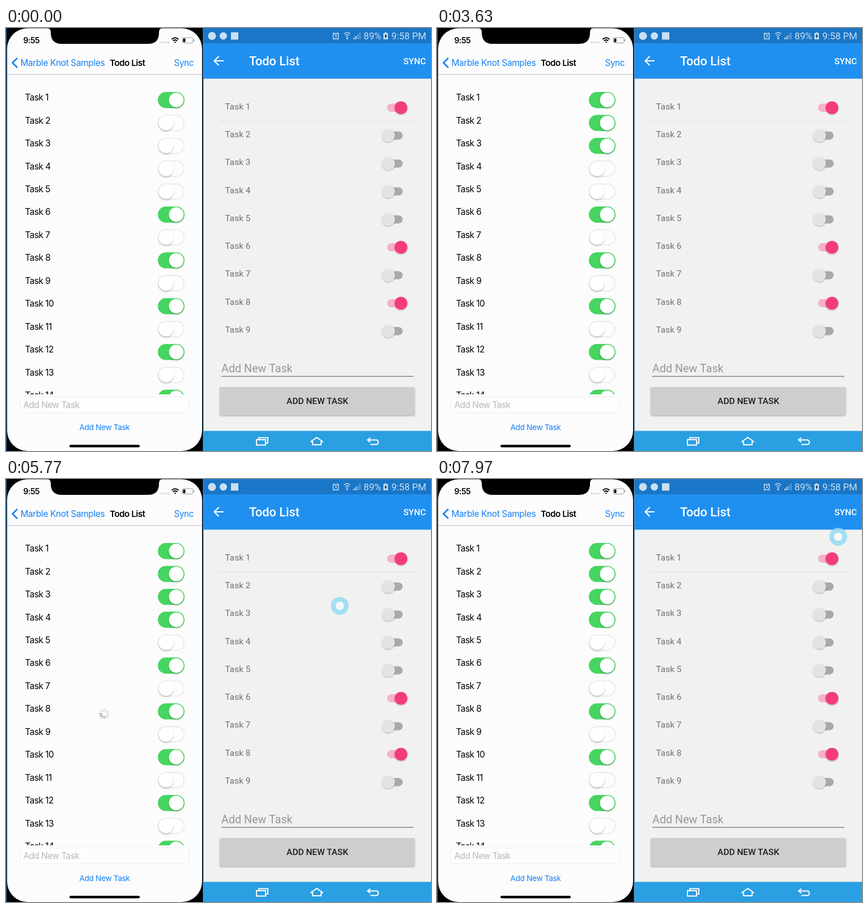
Recreate the animation shown at these times as an HTML page. Size 750 by 747 pixels, loop 8 s.

```html
<!DOCTYPE html>
<html lang="en">
<head>
<meta charset="utf-8">
<title>Todo List</title>
<style>
html, body { margin: 0; width: 100%; height: 100%; overflow: hidden; background: #000; }
svg { display: block; width: 750px; height: 747px; }
.ios { font-family: Inter, sans-serif; font-size: 15.4px; letter-spacing: -.5px; }
.droid { font-family: Roboto, sans-serif; }
.med { font-weight: 500; }
</style>
</head>
<body>
<svg viewBox="0 0 750 747" xmlns="http://www.w3.org/2000/svg">
  <defs>
    <clipPath id="list"><rect x="2" y="83" width="344" height="564"/></clipPath>
    <clipPath id="screen"><rect x="348.500" y="0" width="401.500" height="747"/></clipPath>
    <filter id="soft" x="-50%" y="-50%" width="200%" height="200%">
      <feDropShadow dx="0" dy="2" stdDeviation="1.6" flood-color="#000" flood-opacity=".24"/>
    </filter>
    <filter id="lift" x="-20%" y="-20%" width="140%" height="150%">
      <feDropShadow dx="0" dy="1.2" stdDeviation="1" flood-color="#000" flood-opacity=".3"/>
    </filter>
  </defs>

  <rect width="750" height="747"/>
  <rect width="1.5" height="747" fill="#144f82"/>
  <rect x="347" width="2" height="747" fill="#124a7c"/>

  <g class="ios">
    <rect x="2" y="0.5" width="344" height="746.5" rx="36" fill="#fcfcfc"/>
    <path d="M73 0Q79 1 79 7V8Q79 28 98 28H251Q270 28 270 8V7Q270 1 276 0Z"/>
    <text x="30.500" y="26.500" font-size="14" font-weight="600">9:55</text>
    <g fill="#d8d0b8"><circle cx="273" cy="25.500" r="1.500"/><circle cx="277.500" cy="25.500" r="1.500"/><circle cx="282" cy="25.500" r="1.500"/><circle cx="286.500" cy="25.500" r="1.500"/></g>
    <g fill="none" stroke="#000" stroke-width="2">
      <path d="M292.500 20Q298.500 14.500 304.500 20M294.800 22.800Q298.500 19.500 302.200 22.800"/>
      <path d="M297.300 25.200H299.700"/>
    </g>
    <rect x="311" y="17" width="19" height="9.500" rx="2.500" fill="none" stroke="#999"/>
    <rect x="312.500" y="18.500" width="4" height="6.500" rx="1"/>
    <path d="M331.500 20V23.500" stroke="#999" stroke-width="1.500"/>
    <path d="M20 53L11.500 61.500L20 70" fill="none" stroke="#1580f5" stroke-width="2.700"/>
    <text x="25.500" y="67" fill="#1580f5" letter-spacing="-.35">Marble Knot Samples</text>
    <text x="183" y="67" font-size="15.200" font-weight="600">Todo List</text>
    <text x="331" y="67" text-anchor="end" fill="#1580f5">Sync</text>
    <path d="M2 82H346" stroke="#b8b8d0"/>
    <g id="iosRows" clip-path="url(#list)"></g>
    <rect x="24.500" y="651.500" width="299" height="28" rx="5" fill="#fdfdfd" stroke="#eeeef1"/>
    <text x="30.500" y="670.500" fill="#b8b8bd">Add New Task</text>
    <text x="174" y="710" text-anchor="middle" font-size="13.750" letter-spacing="-.4" fill="#1580f5">Add New Task</text>
    <rect x="112" y="736" width="124" height="4.600" rx="2.300"/>
    <g id="spinner" transform="translate(173.500 414.500)"></g>
  </g>

  <g class="droid" clip-path="url(#screen)">
    <rect x="348" width="402" height="747" fill="#f1f1f0"/>
    <rect x="348" y="27" width="402" height="62.500" fill="#2090f0"/>
    <rect x="348" width="402" height="27" fill="#1a76c6"/>
    <g fill="#c9e0f4">
      <circle cx="363.500" cy="14" r="7"/>
      <circle cx="383.500" cy="14" r="6.500"/>
      <rect x="397" y="7.500" width="13" height="13"/>
    </g>
    <g fill="none" stroke="#c9e0f4" stroke-width="1.400">
      <circle cx="582" cy="14.500" r="4.800"/>
      <path d="M582 11.500V15H584M576.500 10.500L579.500 8M587.500 10.500L584.500 8M578.500 18.500L577 20.500M585.500 18.500L587 20.500"/>
      <path d="M596.500 10.500Q602 5.500 607.500 10.500M598.500 13.300Q602 10 605.500 13.300M600.300 16Q602 14.500 603.700 16"/>
    </g>
    <g fill="#c9e0f4">
      <circle cx="602" cy="18.500" r="1.500"/>
      <path d="M613 17H615V20H613ZM616.500 14H618.500V20H616.500Z"/>
      <path d="M620 11H622V20H620ZM623.500 8H625.500V20H623.500Z" opacity=".45"/>
      <path d="M666 9H668.500V7.500H671.500V9H674V20H666Z"/>
      <path d="M671 9.500L667.500 15H669.500L669 19L672.800 13.500H670.500Z" fill="#163e63"/>
      <text x="631" y="20" font-size="16.800">89%</text>
      <text x="680" y="20" font-size="16.800">9:58 PM</text>
    </g>
    <path d="M384 58H368M375.500 50L367.500 58L375.500 66" fill="none" stroke="#fff" stroke-width="2.200"/>
    <text class="med" x="429" y="66" font-size="21.700" fill="#fff">Todo List</text>
    <text class="med" x="741" y="64" text-anchor="end" font-size="15.400" fill="#fff">SYNC</text>
    <g id="droidRows"></g>
    <text x="380" y="607.600" font-size="19.750" fill="#979797">Add New Task</text>
    <path d="M380 615.300H719" stroke="#868686" stroke-width="1.400"/>
    <rect x="377" y="634" width="344.500" height="50" rx="2" fill="#cecece" filter="url(#lift)"/>
    <text class="med" x="549.500" y="664.300" text-anchor="middle" font-size="15.450" fill="#1c1c1c">ADD NEW TASK</text>
    <rect x="348" y="711.500" width="402" height="36" fill="#2a9fe2"/>
    <g fill="none" stroke="#fff" stroke-width="2">
      <rect x="442" y="727" width="16" height="9.500"/>
      <path d="M446 727V723.500H462V733H458"/>
      <path d="M548.500 723L538 730.500H541V736H556V730.500H559Z" stroke-linejoin="round"/>
      <path d="M643 723.500L638 727.500L643 731.500M638 727.500H653Q657 727.500 657 731.500Q657 735.500 653 735.500H643"/>
    </g>
    <g id="pointer">
      <circle r="8.500" fill="#f8f8fa" opacity=".85"/>
      <circle r="11.500" fill="none" stroke="#90dcf3" stroke-width="8.500" opacity=".82"/>
    </g>
  </g>
</svg>
<script>
const LOOP = 8000;
const TAP_TIME = 190;
const SPIN = { from: 4960, to: 7430 };
const taps = { 2: 2800, 3: 3470, 4: 4140 };
const onTasks = [1, 6, 8, 10, 12, 14];
// time, x, y
const route = [[5250, 768, 165], [5770, 589, 224], [6470, 477, 267], [6620, 477, 267], [7970, 708, 102], [8100, 712, 92]];

const byId = id => document.getElementById(id);
const clamp = v => Math.max(0, Math.min(1, v));
const smooth = v => v * v * (3 - 2 * v);
const mix = (a, b, k) => a + (b - a) * k;

function add(parent, tag, attrs, text) {
  const el = document.createElementNS('http://www.w3.org/2000/svg', tag);
  for (const key in attrs) el.setAttribute(key, attrs[key]);
  if (text) el.textContent = text;
  parent.appendChild(el);
  return el;
}

function iosRow(n) {
  const y = 127.2 + 40.45 * (n - 1), box = byId('iosRows');
  add(box, 'text', { x: 33.5, y: y + 1 }, 'Task ' + n);
  const track = { x: 268.7, y: y - 13.5, width: 45.6, height: 27, rx: 13.5 };
  add(box, 'rect', { ...track, fill: '#fdfdfd', stroke: '#e4e4ee', 'stroke-width': 1.4 });
  const fill = add(box, 'rect', { ...track, fill: '#46d560', stroke: '#46d560', 'stroke-width': 1.4 });
  const thumb = add(box, 'circle', { cy: y, r: 12.9, fill: '#fff', filter: 'url(#soft)' });
  return k => {
    fill.setAttribute('opacity', k);
    thumb.setAttribute('cx', mix(282.3, 300.5, k));
  };
}

function droidRow(n) {
  const i = n - 1, y = 140.7 + 49.32 * i, on = onTasks.includes(n), box = byId('droidRows');
  add(box, 'text', { x: 386.5, y: 143.9 + 49.25 * i, 'font-size': 15.4, fill: '#707070' }, 'Task ' + n);
  add(box, 'rect', { x: 376, y: 164.5 + 49.25 * i, width: 348, height: 1, fill: n < 2 ? '#dcdcf0' : '#ebebf0' });
  add(box, 'rect', { x: on ? 672.5 : 667, y: y - 7.2, width: 33, height: 14.4, rx: 7.2, fill: on ? '#f7b1cd' : '#a9a9a9' });
  add(box, 'circle', { cx: on ? 697 : 675, cy: y, r: 11.3, fill: on ? '#f33c79' : '#e3e3e3', filter: 'url(#lift)' });
}

const setters = Array.from({ length: 14 }, (_, i) => iosRow(i + 1));
for (let n = 1; n <= 9; n++) droidRow(n);
const spokes = Array.from({ length: 12 }, (_, i) => add(byId('spinner'), 'path', {
  d: 'M0 -5V-8.6', stroke: '#666', 'stroke-width': 1.7, 'stroke-linecap': 'round', transform: `rotate(${i * 30})`
}));

function pointerAt(t) {
  const i = route.findIndex((p, j) => j && t < p[0]);
  const a = route[i - 1], b = route[i];
  const k = smooth(clamp((t - a[0]) / (b[0] - a[0])));
  return [mix(a[1], b[1], k), mix(a[2], b[2], k)];
}

function draw(t) {
  setters.forEach((set, i) => {
    const start = taps[i + 1];
    const k = start ? 1 - (1 - clamp((t - start) / TAP_TIME)) ** 3 : onTasks.includes(i + 1) ? 1 : 0;
    set(k);
  });
  const spinning = t >= SPIN.from && t < SPIN.to;
  byId('spinner').setAttribute('visibility', spinning ? 'visible' : 'hidden');
  const head = Math.floor((t - SPIN.from) * 12 / 1000);
  spokes.forEach((s, i) => {
    const age = ((head - i) % 12 + 12) % 12;
    s.setAttribute('opacity', Math.max(0.22, 0.8 - age * 0.1));
  });
  const shown = t >= route[0][0];
  byId('pointer').setAttribute('visibility', shown ? 'visible' : 'hidden');
  byId('pointer').setAttribute('transform', `translate(${pointerAt(t)})`);
}

const begin = performance.now();
function tick() {
  draw((performance.now() - begin) % LOOP);
  requestAnimationFrame(tick);
}
draw(0);
requestAnimationFrame(tick);
</script>
</body>
</html>
```
